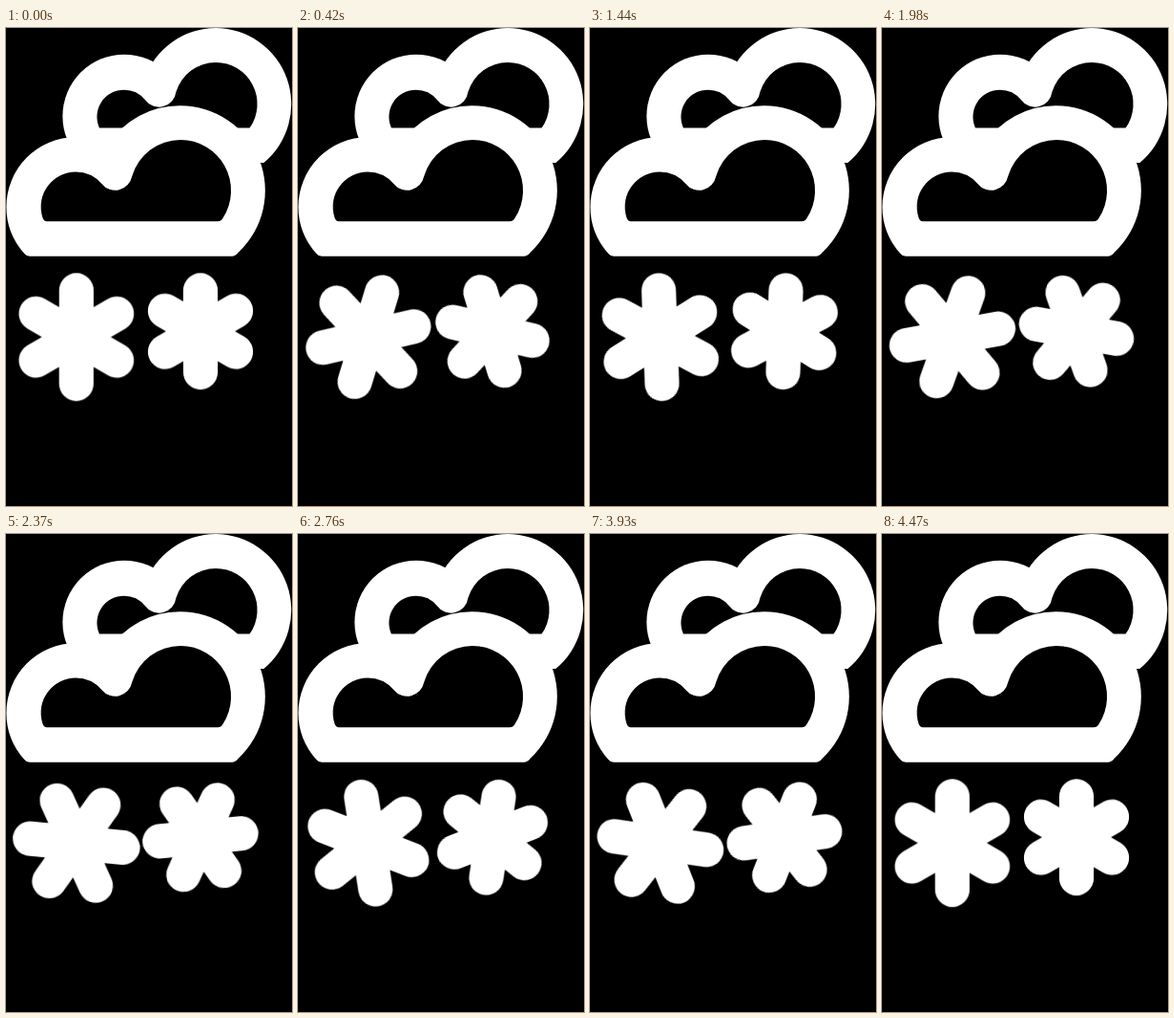
Animation of 300 by 500 pixels, one loop 4.5 s. Source, as an HTML page:

```html
<!DOCTYPE html>
<html lang="en">
<head>
<meta charset="utf-8">
<title>Snow</title>
<style>
  html, body { margin: 0; width: 100%; height: 100%; overflow: hidden; background: #000; }
  svg { display: block; width: 300px; height: 500px; }
  .white { fill: #fff; }
  .flake { fill: none; stroke: #fff; stroke-linecap: round; transform-origin: 0 0; }
</style>
</head>
<body>
<svg viewBox="0 0 300 500">
  <!-- back cloud -->
  <circle class="white" cx="124" cy="92.3" r="64.6"/>
  <path class="white" d="M169.7 141 A79.6 79.6 0 0 1 220 0 A79.6 79.6 0 0 1 270.3 141 Z"/>
  <path d="M97.9 104.6 A28.3 28.3 0 0 1 124 64.7 A28.3 28.3 0 0 1 145.8 75 A18 18 0 0 0 178.4 66.8
    A43.5 43.5 0 0 1 220 36 A43.5 43.5 0 0 1 255.6 104.6 Z"/>

  <!-- front cloud -->
  <path class="white" d="M25 238.8 Q21.5 238.8 19.3 236 A72.8 72.8 0 0 1 0.4 187 A72.8 72.8 0 0 1 73.2 114.2
    A72.8 72.8 0 0 1 107 122.5 A88.7 88.7 0 0 1 183 81.3 A88.7 88.7 0 0 1 243.5 235 Q240.5 238.8 237 238.8 Z"/>
  <path d="M43 202.2 Q39.5 202.2 38.3 198 A36.5 36.5 0 0 1 73.2 150.5 A36.5 36.5 0 0 1 100.4 162.9
    A18 18 0 0 0 132.2 155.1 A53 53 0 0 1 183 117 A53 53 0 0 1 227.4 199 Q225.5 202.2 222 202.2 Z"/>

  <g transform="translate(73.8 323.3)"><path class="flake" data-arm="48.8" data-turn="180"/></g>
  <g transform="translate(204 317.3)"><path class="flake" data-arm="42.8" data-turn="-180"/></g>
</svg>
<script>
  const LOOP = 4500;
  const TURN_END = 4470 / LOOP; // the half turn rests briefly before repeating

  const spoke = (arm, deg) => {
    const a = deg * Math.PI / 180;
    const x = arm * Math.sin(a), y = arm * Math.cos(a);
    return `M${-x} ${-y}L${x} ${y}`;
  };

  for (const flake of document.querySelectorAll('.flake')) {
    const { arm, turn } = flake.dataset;
    flake.setAttribute('d', [0, 60, 120].map(deg => spoke(+arm, deg)).join(''));
    flake.setAttribute('stroke-width', 36.2);
    flake.animate([
      { transform: 'rotate(0deg)', offset: 0 },
      { transform: `rotate(${turn}deg)`, offset: TURN_END },
      { transform: `rotate(${turn}deg)`, offset: 1 }
    ], { duration: LOOP, iterations: Infinity });
  }
</script>
</body>
</html>
```
